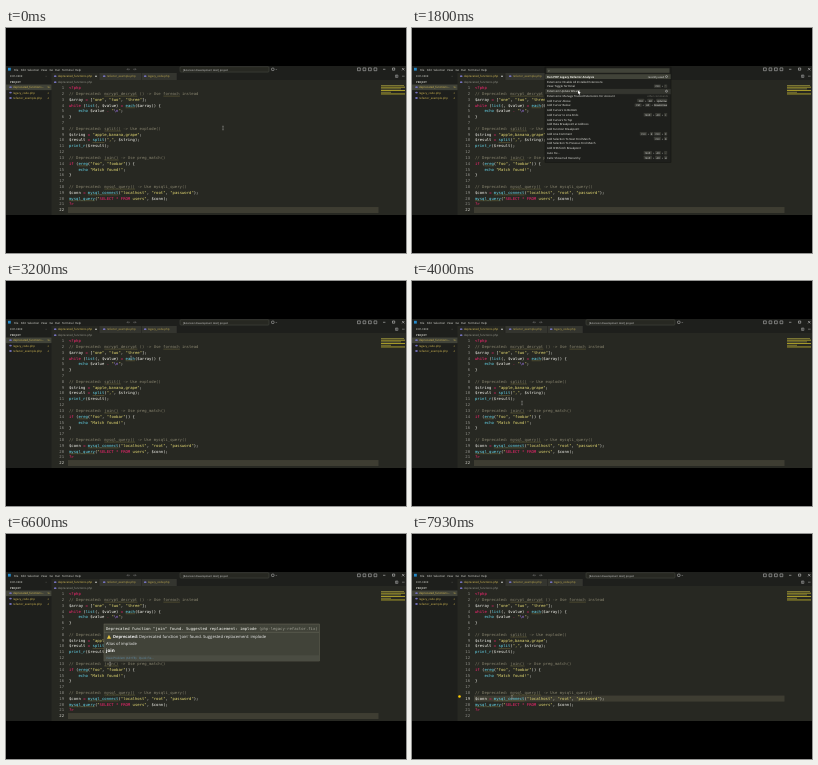
Recreate the animation shown at these times as an HTML page. Size 400x225 px, loop 8 s.

```html
<!DOCTYPE html>
<html lang="en">
<head>
<meta charset="utf-8">
<title>PHP refactor extension</title>
<style>
html, body { margin: 0; width: 100%; height: 100%; overflow: hidden; background: #000; }
svg { display: block; width: 100vw; height: 100vh; }
text { white-space: pre; text-rendering: geometricPrecision; font: 3.2px "Open Sans", sans-serif; fill: #d0d0c8; }
.code { font: 3.92px "DejaVu Sans Mono", monospace; fill: #f8f8f2; }
</style>
</head>
<body>
<svg id="stage" viewBox="0 0 400 225"></svg>
<script>
const stage = document.getElementById('stage');
const CHAR = 2.36, LEFT = 63, LOOP = 8000;
const lineY = n => 60 + (n - 1) * 5.81;

const code = `<?php
// Deprecated: mcrypt_decrypt () -> Use foreach instead
$array = ["one", "two", "three"];
while (list(, $value) = each($array)) {
    echo $value . "\\n";
}

// Deprecated: split() -> Use explode()
$string = "apple,banana,grape";
$result = split(",", $string);
print_r($result);

// Deprecated: join() -> Use preg_match()
if (ereg("foo", "foobar")) {
    echo "Match found!";
}

// Deprecated: mysql_query() -> Use mysqli_query()
$conn = mysql_connect("localhost", "root", "password");
mysql_query("SELECT * FROM users", $conn);
?>
`.split('\n');

// line, first column, length
const warnings = [[2, 15, 14], [2, 40, 7], [4, 24, 4], [8, 15, 7], [10, 10, 5],
  [13, 15, 6], [14, 4, 4], [18, 15, 13], [19, 8, 13], [20, 0, 11]];

const commands = [
  ['Run PHP Legacy Refactor Analysis', 'recently used'],
  ['Extensions: Disable All Installed Extensions'],
  ['View: Toggle Terminal', 'Ctrl + `'],
  ['Extension Update Wizard'],
  ['Extensions: Manage Trusted Extensions For Account', 'other commands'],
  ['Add Cursor Above', 'Ctrl + Alt + UpArrow'],
  ['Add Cursor Below', 'Ctrl + Alt + DownArrow'],
  ['Add Cursors to Bottom'],
  ['Add Cursor to Line Ends', 'Shift + Alt + I'],
  ['Add Cursors To Top'],
  ['Add Data Breakpoint at Address'],
  ['Add Function Breakpoint'],
  ['Add Line Comment', 'Ctrl + K Ctrl + C'],
  ['Add Selection To Next Find Match', 'Ctrl + D'],
  ['Add Selection To Previous Find Match'],
  ['Add XHR/fetch Breakpoint'],
  ['Auto Fix...', 'Shift + Alt + .'],
  ['Calls: Show Call Hierarchy', 'Shift + Alt + H']
];

// Mouse stops: time, x, y
const path = [[0, 217, 100], [1130, 217, 100], [1600, 166, 64], [2330, 166, 64],
  [2470, 125, 77], [3500, 125, 77], [3950, 110, 122], [4530, 110, 122],
  [5330, 98, 97], [5650, 98, 97], [6200, 104, 130], [6700, 104, 130],
  [7070, 89, 148], [7200, 89, 148], [7600, 100, 163], [LOOP, 100, 163]];

function add(tag, attrs, parent = stage, content = '') {
  const el = document.createElementNS('http://www.w3.org/2000/svg', tag);
  for (const k in attrs) el.setAttribute(k, attrs[k]);
  el.textContent = content;
  return parent.appendChild(el);
}
const rect = (x, y, width, height, fill, parent, more) =>
  add('rect', { x, y, width, height, fill, ...more }, parent);
const stroke = (d, color, width, parent) =>
  add('path', { d, stroke: color, 'stroke-width': width, fill: 'none' }, parent);
// y is the middle of the text
const label = (x, y, str, style = '', parent = stage, cls = '') =>
  add('text', { x, y: y + 1.2, style, class: cls }, parent, str);

function colorOf(tok) {
  if (tok.startsWith('//')) return '#88846f';
  if (/^(SELECT|FROM|while|if|<\?php|\?>|[=.*])$/.test(tok)) return '#f92672';
  if (tok === '\\n') return '#ae81ff';
  if (/^[a-z]\w*$/.test(tok)) return '#66d9ef';
  return '#f8f8f2';
}

function codeLine(str, n) {
  const line = label(LEFT, lineY(n), '', '', stage, 'code');
  const span = (s, fill) => add('tspan', { fill }, line, s);
  const tokens = str.match(/\/\/.*|"[^"]*"|<\?php|\?>|\$\w+|\b(?:while|if|echo)\b|\w+(?=\()|[=.]|\s+|./g) || [];
  for (const tok of tokens) {
    if (tok[0] !== '"') span(tok, colorOf(tok));
    else for (const part of tok.split(/(SELECT|FROM|\*|\\n)/))
      span(part, /^(SELECT|FROM|\*|\\n)$/.test(part) ? colorOf(part) : '#e6db74');
  }
}

function drawFrame() {
  rect(0, 38, 400, 149, '#272822');
  rect(0, 38, 400, 7, '#1e1f1c');
  rect(0, 45, 45.5, 142, '#1e1f1c');
  rect(45.5, 45, 354.5, 7, '#1e1f1c');
  rect(45.5, 45, 47.5, 7, '#272822');
  rect(93, 45, 78, 7, '#34352f');
  rect(0, 56.5, 45.5, 5.6, '#414339');
  rect(2, 39.8, 2.8, 2.8, '#2489ca');
  ['File', 'Edit', 'Selection', 'View', 'Go', 'Run', 'Terminal', 'Help'].forEach((s, i) =>
    label([8, 15, 21.5, 35, 43.5, 49, 56, 69][i], 41.3, s, 'font-size:2.8px;fill:#e0e0da'));
  stroke('M396 40l2.4 2.4m0-2.4l-2.4 2.4M386.5 40h2.2v2.2h-2.2zM377 41.3h2.4', '#ddd', .5);
  for (const x of [351.5, 357, 362.5, 368])
    stroke(`M${x} 39.9h2.8v2.8h-2.8z`, '#ccc', .5);
  stroke('M389.5 47h2.4v2.4h-2.4zm1.2 0v2.4M396 48.2h2.6', '#bbb', .45);

  const name = 'font-size:2.85px;fill:';
  const fileIcon = (cx, cy) => add('ellipse', { cx, cy, rx: 1.3, ry: .9, fill: '#7471bb' });
  [[48, 'deprecated_functions.php', '#dcc25a'], [97, 'refactor_example.php', '#c0ab50'],
    [138, 'legacy_code.php', '#c0ab50']].forEach(([x, file, color]) => {
    fileIcon(x + 1.2, 48.2);
    label(x + 3.7, 48.2, file, name + color);
  });
  add('circle', { cx: 90, cy: 48.2, r: .8, fill: '#ddd' });
  stroke('M93.2 45v7M135.5 45v7M171 45v7', '#1e1f1c', .5);
  fileIcon(49.2, 54.2);
  label(51.7, 54.2, 'deprecated_functions.php', name + '#999a90');
  label(4, 48, 'EXPLORER', 'font-size:2.6px');
  label(39, 47.6, '···', 'font-size:2.6px');
  label(4, 53.8, 'PROJECT', 'font-size:2.6px;font-weight:bold');
  ['deprecated_functions...', 'legacy_code.php', 'refactor_example.php'].forEach((file, i) => {
    const y = 59.2 + i * 5.4;
    fileIcon(4.5, y);
    label(7, y, file, name + '#d5bb54');
    label(41.5, y, ['9+', '2', '4'][i], 'font-size:2.5px;fill:#d5bb54');
  });
  [23, 24, 20, 24, 10, 24].forEach((w, i) =>
    rect(375, 57 + i * 1.7, w, .9, i % 2 ? '#b5a72b' : '#857f38'));
}

function drawSearch() {
  const g = add('g', {});
  rect(174, 38.7, 89, 5.4, '#272822', g, { stroke: '#55564e', 'stroke-width': .4, rx: 1 });
  label(177, 41.3, '[Extension Development Host] project', 'font-size:2.55px;fill:#ddd', g);
  stroke('M124 41.3h-3m1-1l-1 1 1 1M127 41.3h3m-1-1l1 1-1 1', '#888', .4, g);
  rect(265.5, 40.1, 2.6, 2.4, 'none', g, { stroke: '#ccc', 'stroke-width': .5, rx: .8 });
  stroke('M269.5 41l.8.8.8-.8', '#aaa', .4, g);
  return g;
}

function drawPalette() {
  const g = add('g', {});
  rect(133, 39, 126, 95.3, '#1e1f1c', g, { stroke: '#11120f', 'stroke-width': .5 });
  rect(134.5, 40.3, 123, 4.5, '#414339', g);
  label(136, 42.6, '>', '', g);
  rect(133.3, 46.2, 125.4, 4.8, '#414339', g);
  rect(133.3, 60.9, 125.4, 4.8, '#34352f', g);
  stroke('M133 65.8h126', '#45463e', .3, g);
  commands.forEach(([name, keys = ''], i) => {
    const y = 48.6 + i * 4.76;
    label(135, y, name, 'font-size:2.8px;fill:#f0f0ea' + (i ? '' : ';font-weight:bold'), g);
    if (!keys.includes('+')) {
      label(i ? 256 : 252, y, keys, 'text-anchor:end;font-size:2.6px;fill:' + (i ? '#77776f' : '#eee'), g);
      return;
    }
    // Key caps, laid out from the right
    let x = 256;
    for (const key of keys.split(' ').reverse()) {
      const w = key === '+' ? 1.6 : key.length * 1.3 + 1.8;
      x -= w + .8;
      if (key !== '+') rect(x, y - 1.7, w, 3.4, '#393a34', g, { rx: .5 });
      label(x + w / 2, y, key, 'text-anchor:middle;font-size:2.4px;fill:#eee', g);
    }
  });
  for (const y of [48.6, 63.2])
    add('circle', { cx: 254.5, cy: y, r: 1, stroke: '#ccc', 'stroke-width': .5, fill: 'none' }, g);
  return g;
}

function drawHover() {
  const g = add('g', {});
  rect(98, 90, 215.5, 37, '#414339', g, { stroke: '#6b6a5a', 'stroke-width': .5 });
  rect(98.3, 121.3, 215, 5.5, '#4a4c42', g);
  const head = label(100, 94.5, 'Deprecated function "join" found. Suggested replacement: implode ', '', g, 'code');
  add('tspan', { fill: '#a0a095' }, head, '(php-legacy-refactor.fix)');
  stroke('M98 98.3h215', '#6b6a5a', .5, g);
  add('path', { d: 'M103 100.8l2.1 3.9h-4.2z', fill: '#e4c545' }, g);
  const body = 'font-size:4.13px;fill:#eee';
  const msg = label(107, 103, '', body, g);
  add('tspan', { 'font-weight': 'bold' }, msg, 'Deprecated:');
  add('tspan', {}, msg, " Deprecated function 'join' found. Suggested replacement: implode");
  label(100, 110, 'Alias of implode', body, g);
  label(100, 117, 'join', 'font-size:4.6px;font-weight:bold;fill:#fff', g);
  label(100, 124, 'View Problem (Alt+F8)   Quick Fix...', 'font-size:3px;fill:#5f8ca8', g);
  return g;
}

drawFrame();
const band = rect(62, 0, 310.5, 6, '#3e3d32');
const numbers = code.map((s, i) => {
  codeLine(s, i + 1);
  return label(58, lineY(i + 1), i + 1, 'text-anchor:end', stage, 'code');
});
for (const [n, col, len] of warnings)
  stroke(`M${LEFT + col * CHAR} ${lineY(n) + 2.3}h${len * CHAR}`, '#807a42', .4);
const bulb = add('circle', { cx: 47.5, cy: 162.5, r: 1.3, fill: '#ffcc00' });
const search = drawSearch(), palette = drawPalette(), hover = drawHover();
const beam = stroke('M-.7-1.8h1.4M0-1.8v3.6M-.7 1.8h1.4', '#bbb', .4);
const arrow = add('path', { d: 'M0-1.5v3.6l.9-.8.6 1.4.7-.3-.6-1.4h1.2z', fill: '#fff' });

const show = (el, on) => el.setAttribute('visibility', on ? 'visible' : 'hidden');

function mouseAt(t) {
  const i = path.findIndex(p => p[0] > t), [t0, x0, y0] = path[i - 1], [t1, x1, y1] = path[i];
  const u = (t - t0) / (t1 - t0), e = u * u * (3 - 2 * u);
  return `translate(${x0 + (x1 - x0) * e} ${y0 + (y1 - y0) * e})`;
}

function draw(now) {
  const t = now % LOOP;
  const open = t >= 1130 && t < 2000, clicked = t >= 7530;
  const current = clicked ? 19 : 22;
  show(palette, open);
  show(search, !open);
  show(hover, t >= 6500 && t < 7130);
  show(bulb, clicked);
  show(arrow, open);
  show(beam, !open);
  band.setAttribute('y', lineY(current) - 3);
  numbers.forEach((el, i) => el.style.fill = i + 1 === current ? '#d8d8d0' : '#90908a');
  for (const el of [beam, arrow]) el.setAttribute('transform', mouseAt(t));
  requestAnimationFrame(draw);
}
requestAnimationFrame(draw);
</script>
</body>
</html>
```
